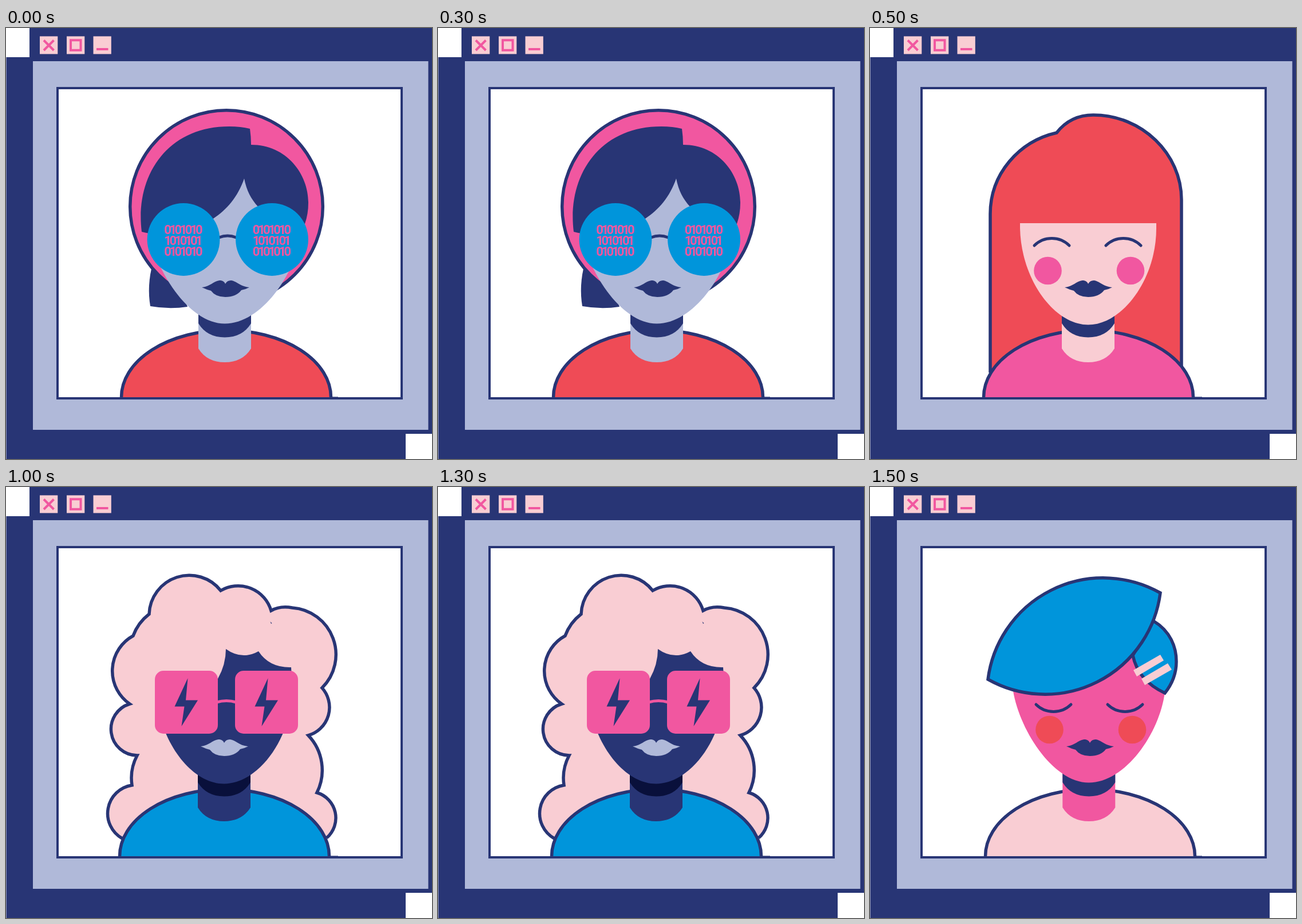
Animation, 744 px wide and 753 px high, one loop 2 s. Source, as an HTML page:

```html
<!DOCTYPE html>
<html lang="en">
<head>
<meta charset="utf-8">
<title>Portrait window</title>
<style>
html, body { margin: 0; width: 100%; height: 100%; overflow: hidden; background: #fff; }
svg { display: block; width: 744px; height: 753px; }
.navy { fill: #283575; }
.sky { fill: #b0b9d9; }
.pink { fill: #f157a0; }
.pale { fill: #f9cdd3; }
.red { fill: #ef4b56; }
.blue { fill: #0095db; }
.ink { fill: #09103b; }
.edge { stroke: #283575; stroke-width: 5.5; }
.line { fill: none; stroke: #283575; stroke-width: 5; stroke-linecap: round; }
.icon { fill: none; stroke: #f157a0; stroke-width: 4; }
text { font: 700 22px Roboto, Arial, sans-serif; letter-spacing: -3.5px; text-anchor: middle; }
.person { opacity: 0; animation: show 2s step-end infinite; }
@keyframes show { 0% { opacity: 1; } 25%, 100% { opacity: 0; } }
</style>
</head>
<body>
<svg id="stage" viewBox="0 0 744 753"></svg>
<script>
const path = (cls, d) => `<path class="${cls}" d="${d}"/>`;
const disc = (cls, x, y, r) => `<circle class="${cls}" cx="${x}" cy="${y}" r="${r}"/>`;
const box = (cls, x, y, w, h, rx = 0) =>
  `<rect class="${cls}" x="${x}" y="${y}" width="${w}" height="${h}" rx="${rx}"/>`;
const move = (x, art) => `<g transform="translate(${x})">${art}</g>`;

const body = (cls, x = 0) => move(x, path(cls + ' edge', 'M198.5 645 A183 117 0 0 1 564.5 645'));
const neck = (skin, shade, x = 0) => move(x,
  path(skin, 'M335 490 H427 V560 Q412 584 381 584 Q350 584 335 560Z') +
  path(shade, 'M335 495 H427 V516 Q412 540.5 381 540.5 Q350 540.5 335 516Z'));
const lips = (cls, x = 0) => move(x, path(cls,
  'M340 453 C355 452 361 441 373 441 Q379 442 381 447 Q384 441 391 441 ' +
  'C401 442 407 452 423 453 Q416 457 409 458 Q400 470 381 470 Q364 470 356 459 Q348 457 340 453Z'));
const eyes = (x, sweep) => [x, x + 125].map(l =>
  path('line', `M${l} 380 A43.5 43.5 0 0 ${sweep} ${l + 61} 380`)).join('');
const cheeks = (cls, x) => disc(cls, x, 424, 24.3) + disc(cls, x + 144.5, 424, 24.3);

const wideFace = 'M249 350 C258 420 318 516.5 382 516.5 C446 516.5 506 430 515 358 L500 300 L416 240 L249 330Z';
const chin = 'C500 440 440 518.5 381 518.5 C322 518.5 264 440 262 350';

const binary = x => ['0101010', '1010101', '0101010'].map((row, i) =>
  `<text class="pink" x="${x}" y="${360 + i * 19}">${row}</text>`).join('');
const lens = x => disc('blue', x, 369.5, 63.4) + binary(x - 1.8);
const bolt = x => box('pink', x, 321, 110, 110, 15) +
  path('navy', `M${x + 57.5} 334 l-23 49.5 h17 l-5 34.5 28.5 -45.5 h-21Z`);

const coder =
  path('navy', 'M256 412 Q246 450 252 486 Q285 492 317 487 L290 420Z') +
  disc('pink edge', 385, 312, 168.3) +
  body('red', 3) + neck('sky', 'navy', 1) + path('sky', wideFace) +
  path('navy', 'M237 356 C225 260 280 172 390 172 Q410 172 426 176 Q428 190 428 204 ' +
    'C490 204 528 255 528 305 Q528 325 522 342 L480 340 C450 325 424 305 416 263 ' +
    'C405 295 385 318 362 333 L300 362 Q260 362 237 356Z') +
  path('line', 'M372 366 Q387 360 402 366') +
  lens(310) + lens(464.5) + lips('navy', 2);

const redhead =
  path('red edge', 'M210 602 V325 C210 255 260 198 326 183 Q350 152 390 152 ' +
    'C475 152 544 220 544 300 V602') +
  body('pink') + neck('pale', 'navy') +
  path('pale', `M262 341 H500 V350 ${chin}Z`) +
  eyes(287, 1) + cheeks('pink', 310.5) + lips('navy');

const curls =
  path('pale edge', 'M203 614 A50 50 0 0 1 220 521 A84 84 0 0 1 229 469 A46 46 0 0 1 216 379 ' +
    'A70 70 0 0 1 222 260 A85 85 0 0 1 250 222 A70 70 0 0 1 375 181 A60 60 0 0 1 463 216 ' +
    'Q479 207 500 211 A82 82 0 0 1 552 351 A51 51 0 0 1 528 434 A88 88 0 0 1 543 534 ' +
    'A46 46 0 0 1 560 613') +
  path('navy', 'M461.5 235 l3 3 -1.5 1Z') +
  body('blue') + neck('navy', 'ink') +
  path('navy', `M370 335 Q384 310 384 283 Q412 303 441 287 Q460 316 498 315 L500 350 ${chin}Z`) +
  '<path class="icon" style="stroke-width:5" d="M368 376 Q385 371 402 376"/>' +
  bolt(260) + bolt(400) + lips('sky');

const swoop =
  body('pale', 3) + neck('pink', 'navy', 1.3) + path('pink', wideFace) +
  path('blue edge', 'M495 234 C525 252 535 280 535 305 Q535 335 515 360 Q468 338 459 294Z') +
  path('pale', 'M460 320 L507 293 L513 303 L466 331Z M474 335 L520 308 L527 319 L480 346Z') +
  path('blue edge', 'M206 336 A203 203 0 0 1 507 185 A203 203 0 0 1 206 336Z') +
  eyes(290, 0) + cheeks('red', 313.5) + lips('navy', 3);

const people = [coder, redhead, curls, swoop].map((art, i) =>
  `<g class="person" style="animation-delay:${(i - 4) * 0.5}s">${art}</g>`).join('');

document.getElementById('stage').innerHTML =
  box('navy', 0.5, 51, 697.5, 702) + box('navy', 41, 0, 703, 709) +
  box('sky', 47, 58, 690.5, 644) +
  [59, 106, 152.5].map(x => box('pale', x, 14.5, 31.3, 31)).join('') +
  path('icon', 'M66 21.5 L83.5 39 M83.5 21.5 L66 39') +
  box('icon', 113, 21.3, 17.5, 17.5) + path('icon', 'M158 37 H178.5') +
  '<rect x="90" y="105" width="601" height="542" fill="#fff"/>' +
  people +
  box('navy', 566, 644.4, 14, 2) +
  '<rect x="90" y="105" width="601" height="542" fill="none" stroke="#283575" stroke-width="4"/>';
</script>
</body>
</html>
```
